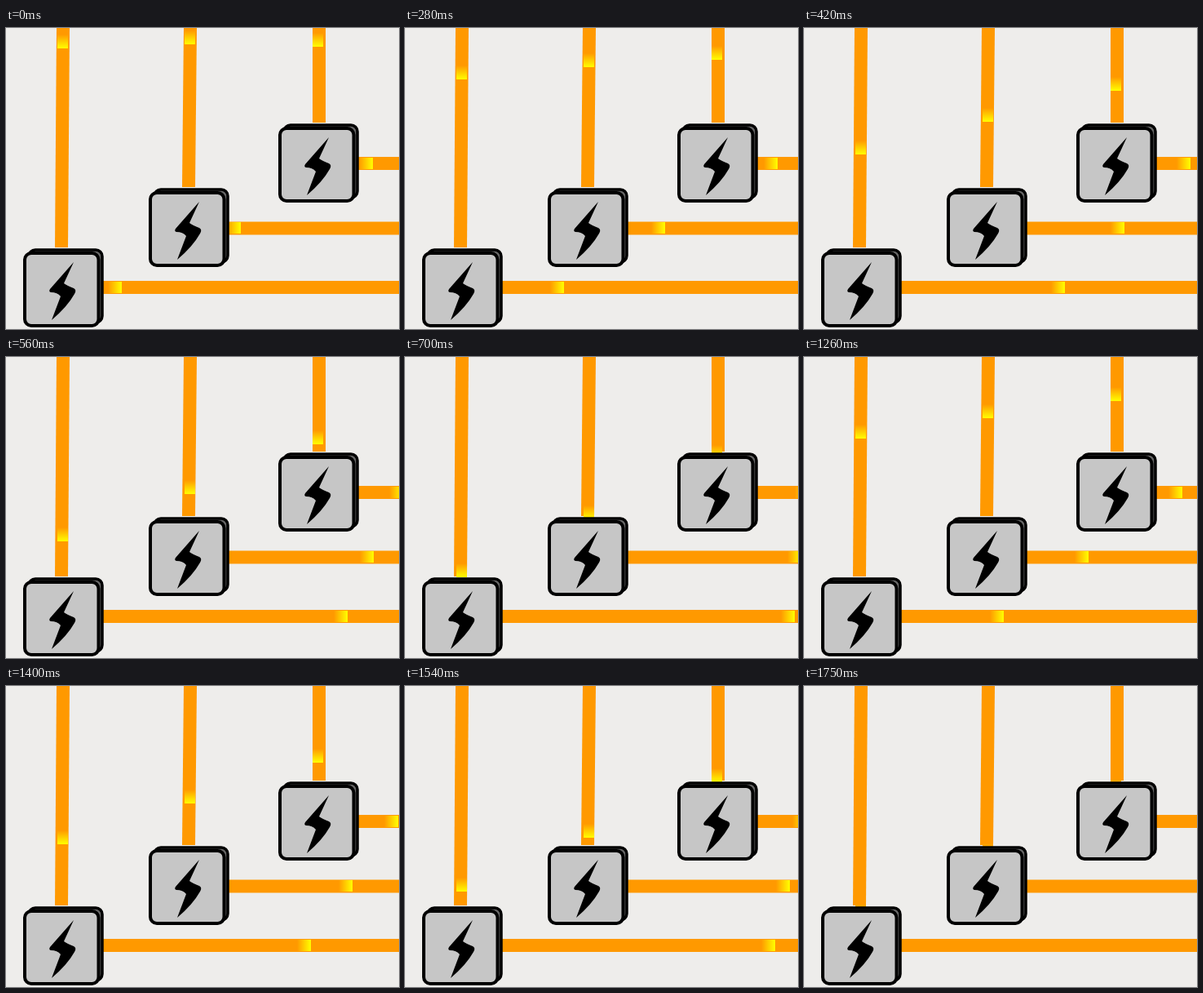
An HTML page with a canvas for the animation above (1820 ms loop, 482 by 369 pixels).

```html
<!DOCTYPE html>
<html lang="en">
<head>
<meta charset="utf-8">
<title>Power lines</title>
<style>
  html, body { margin: 0; width: 100%; height: 100%; overflow: hidden; background: #eeedeb; }
  canvas { display: block; }
</style>
</head>
<body>
<canvas id="stage" width="482" height="369"></canvas>
<script>
const ctx = document.getElementById('stage').getContext('2d');
const WIDTH = 482, HEIGHT = 369;
const STEP_MS = 70, STEPS = 13;
const WIRE = 16, PULSE_LENGTH = 17;
const ORANGE = '#ff9900', YELLOW = '#ffff00';

// Each box has a wire coming down into it and one leaving to the right.
// topHead and sideHead are where the pulses' leading edges start.
const BOXES = [
  { x: 21, y: 270, wireX: 62, wireY: 310, lean: 2, topHead: 25, sideHead: 142 },
  { x: 175, y: 196, wireX: 218, wireY: 237.5, lean: 2, topHead: 20, sideHead: 288 },
  { x: 334, y: 117, wireX: 376, wireY: 158, lean: 0, topHead: 23, sideHead: 450 }
];

const BOLT = new Path2D(
  'M62 17 L33 50 Q31 53 34 54 Q42 54 46 59 L35 88 Q54 72 63 56 Q66 51 62 49 Q54 46 50 43 Z'
);

// Cubic start, quadratic stop.
const ease = t => t < 0.5 ? 4 * t ** 3 : 1 - 2 * (1 - t) ** 2;
const mix = (from, to, amount) => Math.round(from + (to - from) * amount);

function drawWires({ x, y, wireX, wireY, lean }) {
  ctx.fillStyle = ORANGE;
  ctx.beginPath();
  ctx.moveTo(wireX, 0);
  ctx.lineTo(wireX + WIRE, 0);
  ctx.lineTo(wireX + WIRE - lean, y - 1);
  ctx.lineTo(wireX - lean, y - 1);
  ctx.fill();
  ctx.fillRect(x + 95, wireY, WIDTH, WIRE);
}

// Draws along the x axis; the caller's transform sets the direction.
function drawPulse(head, side, size) {
  const tail = head - PULSE_LENGTH;
  const glow = ctx.createLinearGradient(tail, 0, head, 0);
  glow.addColorStop(0, ORANGE);
  glow.addColorStop(1, YELLOW);
  ctx.fillStyle = glow;
  ctx.fillRect(tail, side, PULSE_LENGTH, size);
}

function drawPulses({ y, wireX, wireY, lean, topHead, sideHead }, progress) {
  drawPulse(mix(sideHead, 498, progress), Math.ceil(wireY + 0.5), 14);
  ctx.save();
  ctx.transform(0, 1, 1, 0, 0, 0);
  drawPulse(mix(topHead, y + 14, progress), wireX + lean / 2, 13);
  ctx.restore();
}

function drawPanel(x, y, width, height, stroke, color) {
  ctx.beginPath();
  ctx.roundRect(x, y, width, height, 8);
  ctx.fillStyle = color;
  ctx.fill();
  ctx.lineWidth = stroke;
  ctx.stroke();
}

function drawBox({ x, y }) {
  ctx.save();
  ctx.translate(x, y);
  drawPanel(7, 2, 90, 89, 3.5, '#666');
  drawPanel(2, 6, 90.5, 89, 4, '#c6c6c6');
  ctx.fillStyle = '#000';
  ctx.fill(BOLT);
  ctx.restore();
}

const startTime = performance.now();

function draw() {
  const step = Math.floor((performance.now() - startTime) / STEP_MS) % STEPS;
  const progress = ease(step / (STEPS - 1));
  ctx.fillStyle = '#eeedeb';
  ctx.fillRect(0, 0, WIDTH, HEIGHT);
  for (const box of BOXES) {
    drawWires(box);
    drawPulses(box, progress);
    drawBox(box);
  }
  requestAnimationFrame(draw);
}
draw();
</script>
</body>
</html>
```
